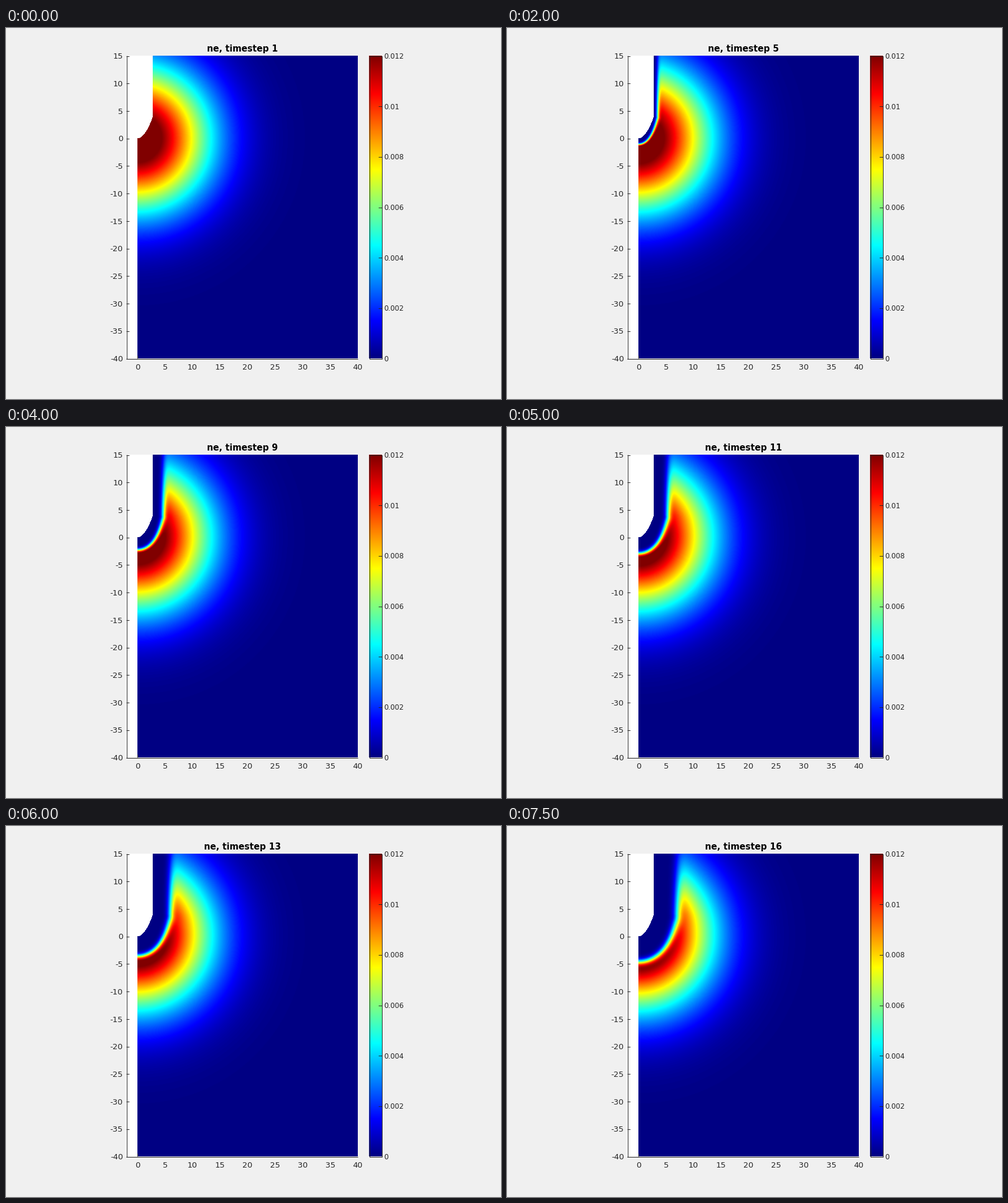
Recreate the animation shown at these times as a matplotlib script. Size 840 by 630 pixels, loop 8000 ms.

```python
import numpy as np
import matplotlib.pyplot as plt
from matplotlib.animation import FuncAnimation

W, H, DPI = 840, 630, 96
LEFT, RIGHT, TOP, BOTTOM = 223, 597, 47, 561   # density map, px
SX, SY = (RIGHT - LEFT) / 40, (BOTTOM - TOP) / 55
ROD, VMAX, STEPS = 2.78, 0.012, 16
INK = "#262626"

plt.rcParams["font.family"] = "DejaVu Sans"


def jet_table():
    ramp = np.arange(1, 65) / 64
    u = np.concatenate([np.zeros(96), ramp, np.ones(63), ramp[::-1], np.zeros(97)])
    k = np.arange(256)
    rgb = np.stack([u[k], u[k + 64], u[k + 128]], axis=1)
    return np.round(rgb * 255).astype(np.uint8)


JET = jet_table()

# Grid in physical units, one cell per pixel
x, y = np.meshgrid((np.arange(RIGHT - LEFT) + 0.5) / SX,
                   15 - (np.arange(BOTTOM - TOP) + 0.5) / SY)
inside = (x < ROD) & (y > 0.5 * x**2)


def nearest_on_rod():
    """Distance to the rod surface and the nearest point on it."""
    tip = np.linspace(0, ROD, 90)
    shaft = np.linspace(0.5 * ROD**2, 15.2, 180)
    pts = np.vstack([np.c_[tip, 0.5 * tip**2],
                     np.c_[np.full(shaft.size, ROD), shaft]])
    best = np.full(x.shape, np.inf)
    px, py = np.zeros_like(x), np.zeros_like(x)
    for a, b in pts:
        d2 = (x - a)**2 + (y - b)**2
        m = d2 < best
        best[m], px[m], py[m] = d2[m], a, b
    return np.sqrt(best), px, py


dist, near_x, near_y = nearest_on_rod()
nx, ny = (x - near_x) / (dist + 1e-9), (y - near_y) / (dist + 1e-9)
side = np.clip(near_y / 4, 0, 1)


def density(step):
    """Gaussian cloud pushed away from the rod by a widening front."""
    t = step - 1
    front = 0.27 * t + 0.003 * t**2
    push = 0.466 * front * np.exp(-np.maximum(dist - front, 0) / 4)
    n = 0.0135 * np.exp(-((x - push * nx)**2 + (y - push * ny)**2) / 163)
    if t == 0:
        return n
    edge = front - side * min(0.4, 0.4 * front)
    width = (0.11 + 0.03 * step) * (1 + 0.25 * side)
    z = np.clip((dist - edge) / width, -8, 8)
    return n * 0.5 * (1 + np.tanh(0.7979 * z * (1 + 0.0447 * z**2)))


def paint(step):
    level = np.clip(density(step) / VMAX * 256, 0, 255).astype(int)
    rgb = JET[level]
    rgb[inside] = 255
    return rgb


fig = plt.figure(figsize=(W / DPI, H / DPI), dpi=DPI, facecolor="#f0f0f0")
ax = fig.add_axes([0, 0, 1, 1])
ax.axis("off")


def line(x0, y0, x1, y1):
    ax.plot([x0, x1], [y0, y1], color=INK, lw=0.75,
            solid_capstyle="butt", zorder=4)


def label(px, py, s, ha, size=10):
    ax.text(px, py + 0.365 * size * DPI / 72, s, ha=ha, va="baseline",
            fontsize=size, color=INK)


def picture(data, x0, x1):
    return ax.imshow(data, extent=(x0, x1, BOTTOM, TOP), aspect="auto",
                     interpolation="nearest", zorder=2)


ax.add_patch(plt.Rectangle((204, TOP), LEFT - 204, BOTTOM - TOP,
                           fc="white", ec="none", zorder=1))
field = picture(paint(1), LEFT, RIGHT)
rows = np.arange(BOTTOM - TOP)[::-1] * 256 // (BOTTOM - TOP)
picture(JET[rows][:, None, :], 616, 638)

# Axes
line(204.5, TOP, 204.5, BOTTOM + 1)
line(204, BOTTOM + 0.5, RIGHT, BOTTOM + 0.5)
line(222.5, 556, 222.5, BOTTOM)
for v in range(-40, 16, 5):
    py = TOP + (15 - v) * SY
    line(204, py + 0.5, 209, py + 0.5)
    label(198.6, py + 0.3, str(v), "right")
for v in range(0, 41, 5):
    label(LEFT + v * SX, 574.7, str(v), "center")

# Colour bar
ax.add_patch(plt.Rectangle((616.5, TOP + 0.5), 21, BOTTOM - TOP,
                           fc="none", ec=INK, lw=0.75, zorder=4))
for i in range(7):
    py = BOTTOM - i * (BOTTOM - TOP) / 6
    line(632, py + 0.5, 638, py + 0.5)
    label(641.6, py + 0.5, f"{i * 0.002:g}", "left", 9)

title = ax.text(401, 40, "", ha="center", va="baseline", fontsize=11,
                fontweight="bold", color="black")
ax.set_xlim(0, W)
ax.set_ylim(H, 0)


def update(i):
    field.set_data(paint(i + 1))
    title.set_text(f"ne, timestep {i + 1}")
    return field, title


anim = FuncAnimation(fig, update, frames=STEPS, interval=500,
                     repeat=True, repeat_delay=0, blit=False)
plt.show()
```
